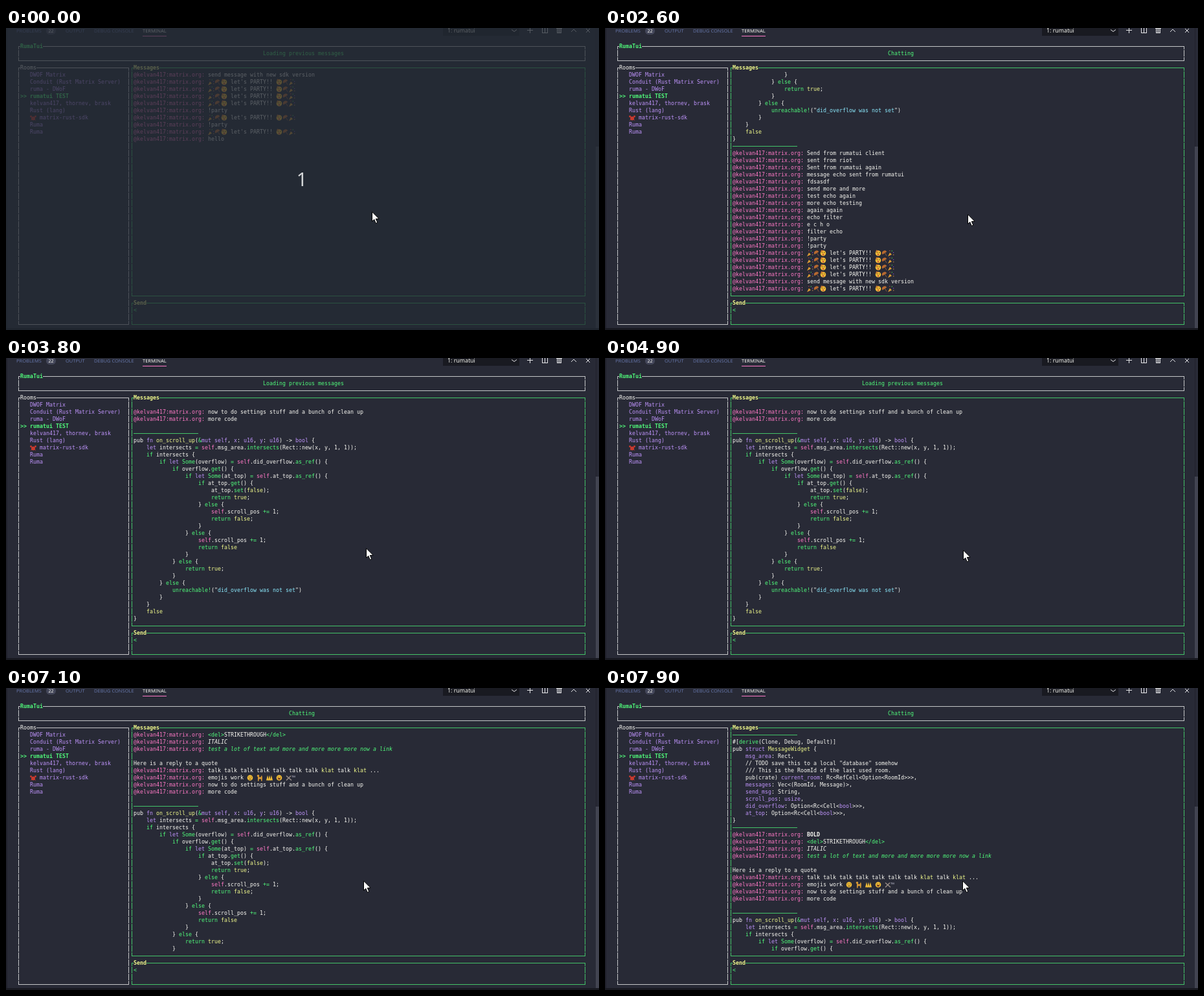
Recreate the animation shown at these times as an HTML page with a canvas. Size 916 px wide and 466 px high, loop 8 s.

```html
<!DOCTYPE html>
<html lang="en">
<head>
<meta charset="utf-8">
<title>Terminal chat client</title>
<style>
html, body { margin: 0; width: 100%; height: 100%; overflow: hidden; background: #282a36; }
canvas { display: block; }
</style>
</head>
<body>
<canvas id="stage" width="916" height="466"></canvas>
<script>
const ctx = document.getElementById('stage').getContext('2d');
const LOOP = 8000, CELL = 5, ROW = 11, VISIBLE = 31;
const MONO = '8.3px "DejaVu Sans Mono", monospace', SANS = '"Noto Sans", sans-serif';
const COLORS = { w: '#f8f8f2', p: '#ff79c6', v: '#bd93f9', g: '#50fa7b', y: '#f1fa8c', c: '#8be9fd' };
const GREY_LINE = '#c4c5c7', GREEN_LINE = '#43c268';
const USER = 'kelvan417';
const PARTY = "@🎉🎊🥳 let's PARTY!! 🥳🎊🎉";
const RULE = '---';

// A backtick plus a letter switches colour (w p v g y c) or style (B I).
const code = (depth, text) => ' '.repeat(depth * 4) + text;
const ELSE = '} `gelse `w{';
const ADD = '`pself`w.scroll_pos `g+= `w1;';
const LINES = [
  RULE,
  '#[`gderive`w(Clone, Debug, Default)]',
  'pub `vstruct `yMessageWidget `w{',
  code(1, '`vmsg_area`w: Rect,'),
  code(1, '// TODO save this to a local "database" somehow'),
  code(1, '/// This is the RoomId of the last used room.'),
  code(1, 'pub(crate) `vcurrent_room`w: Rc<RefCell<Option<RoomId>>>,'),
  code(1, '`vmessages`w: Vec<(RoomId, Message)>,'),
  code(1, '`vsend_msg`w: String,'),
  code(1, '`vscroll_pos`w: `vusize`w,'),
  code(1, '`vdid_overflow`w: Option<Rc<Cell<`vbool`w>>>,'),
  code(1, '`vat_top`w: Option<Rc<Cell<`vbool`w>>>,'),
  '}',
  RULE,
  '@`BBOLD',
  '@`g<del>`wSTRIKETHROUGH`g</del>',
  '@`IITALIC',
  '@`I`gtest a lot of text and more and more more more now a link',
  '',
  'Here is a reply to a quote',
  '@talk talk talk talk talk talk talk `yklat`w talk `yklat`w ...',
  '@emojis work 😐 🐕 👑 😆 🛠',
  '@now to do settings stuff and a bunch of clean up',
  '@more code',
  '',
  RULE,
  'pub `vfn `yon_scroll_up`w(`g&`vmut self`w, `vx`w: `vu16`w, `vy`w: `vu16`w) -> `vbool `w{',
  code(1, '`vlet `wintersects `g= `pself`w.msg_area.`gintersects`w(Rect::new(x, y, 1, 1));'),
  code(1, '`gif `wintersects {'),
  code(2, '`gif `vlet `gSome`w(overflow) `g= `pself`w.did_overflow.`gas_ref`w() {'),
  code(3, '`gif `woverflow.`gget`w() {'),
  code(4, '`gif `vlet `gSome`w(at_top) `g= `pself`w.at_top.`gas_ref`w() {'),
  code(5, '`gif `wat_top.`gget`w() {'),
  code(6, 'at_top.`gset`w(`yfalse`w);'),
  code(6, '`greturn `ytrue`w;'),
  code(5, ELSE),
  code(6, ADD),
  code(6, '`greturn `yfalse`w;'),
  code(5, '}'),
  code(4, ELSE),
  code(5, ADD),
  code(5, '`greturn `yfalse'),
  code(4, '}'),
  code(3, ELSE),
  code(4, '`greturn `ytrue`w;'),
  code(3, '}'),
  code(2, ELSE),
  code(3, '`gunreachable!`w("`cdid_overflow was not set`w")'),
  code(2, '}'),
  code(1, '}'),
  code(1, '`yfalse'),
  '}',
  RULE,
  '@Send from rumatui client',
  '@sent from riot',
  '@Sent from rumatui again',
  '@message echo sent from rumatui',
  '@fdsasdf',
  '@send more and more',
  '@test echo again',
  '@more echo testing',
  '@again again',
  '@echo filter',
  '@e c h o',
  '@filter echo',
  '@!party',
  '@!party',
  PARTY, PARTY, PARTY, PARTY,
  '@send message with new sdk version',
  PARTY, PARTY, PARTY, PARTY,
  '@!party',
  PARTY,
  '@!party',
  PARTY,
  '@hello'
];
const ROOMS = ['`vDWOF Matrix', '`vConduit (Rust Matrix Server)', '`vruma - DWoF', '`B`grumatui TEST',
  '`v' + USER + ', thornev, brask', '`vRust (lang)', '`v🦀 matrix-rust-sdk', '`vRuma', '`vRuma'];
const FIRST_BATCH = LINES.indexOf('@send message with new sdk version');
const SECOND_BATCH = LINES.indexOf('@now to do settings stuff and a bunch of clean up');

// Bursts of the wheel: start time, ticks of 100 ms, lines moved.
const BURSTS = [[1700, 2, 2], [2000, 4, 4], [2600, 7, 9], [3400, 5, 13], [6800, 7, 10], [7500, 2, 5], [7800, 2, 6]];
// Time, then the pointer tip.
const POINTER = [[0, 566, 283], [2600, 561, 287], [3800, 557, 293], [4900, 554, 296], [5200, 553, 297]];

const isLoading = t => t < 400 || t >= 3800 && t < 6200 || t >= 6800 && t < 6900;

function firstLine(t) {
  if (t < 400) return FIRST_BATCH;
  let top = LINES.length - VISIBLE - 1;
  for (const [start, ticks, lines] of BURSTS) {
    const done = Math.floor((t - start) / 100) + 1;
    top -= Math.round(lines * Math.max(0, Math.min(1, done / ticks)));
  }
  return top;
}

const colX = col => 17 + col * CELL;
const rowY = row => 28 + row * ROW;

function rect(color, x, y, w, h) {
  ctx.fillStyle = color;
  ctx.fillRect(x, y, w, h);
}

function dot(color, x, y, r, from = 0, to = 7) {
  ctx.fillStyle = color;
  ctx.beginPath();
  ctx.arc(x, y, r, from, to);
  ctx.fill();
}

function path(pts, closed) {
  ctx.beginPath();
  for (let i = 0; i < pts.length; i += 2) ctx.lineTo(pts[i], pts[i + 1]);
  if (closed) ctx.closePath();
}

function poly(color, ...pts) {
  path(pts, true);
  ctx.fillStyle = color;
  ctx.fill();
}

function line(color, width, ...pts) {
  path(pts);
  ctx.strokeStyle = color;
  ctx.lineWidth = width;
  ctx.stroke();
}

function label(str, x, y, size, color) {
  ctx.font = size + 'px ' + SANS;
  ctx.fillStyle = color;
  ctx.fillText(str, x, y);
}

function confetti(count) {
  for (let i = 0; i < count; i++) {
    const angle = i * 0.7 - 1.8;
    dot(`hsl(${i * 130}, 55%, 55%)`, 4 + 5 * Math.cos(angle), 6 + 5 * Math.sin(angle), 0.7);
  }
}

function face() {
  dot('#f0bd38', 5, 5, 4.3);
  for (const x of [3.4, 6.6]) dot('#5b3b15', x, 4, 0.7);
}

// Each glyph fills a 10 by 10 box.
const EMOJI = {
  '🎉'() {
    poly('#d99a35', 0, 10, 3, 4, 6, 7);
    confetti(4);
  },
  '🎊'() {
    dot('#b96a30', 5, 5, 4, 2.6, 5.7);
    line('#8a5a3a', 1, 5, 4, 8, 9);
  },
  '🥳'() {
    face();
    poly('#c9782f', 1, 4, 2, 0, 6, 1);
    dot('#c9503c', 5, 7, 1.2);
  },
  '😐'() {
    face();
    rect('#5b3b15', 3, 6.5, 4, 0.8);
  },
  '😆'() {
    face();
    dot('#70351f', 5, 5.6, 2.4, 0, Math.PI);
  },
  '🐕'() {
    dot('#d99a35', 2.5, 2, 1.7);
    for (const x of [2, 7]) rect('#d99a35', x, 2, 1.6, 8);
    rect('#d99a35', 2, 4, 6.5, 3);
  },
  '👑'() {
    for (const x of [2, 5, 8]) poly('#f0bd38', x - 2, 9, x, 1, x + 2, 9);
  },
  '🛠'() {
    line('#9a8f88', 1.5, 1, 9, 8, 2);
    line('#9a8f88', 1.5, 1, 2, 9, 9);
    label('™', 9, 7, 8, '#aaaabb');
  },
  '🦀'() {
    dot('#c93a2e', 5, 6, 3);
    for (const x of [1.5, 8.5]) {
      dot('#c93a2e', x, 3, 1.4);
      line('#c93a2e', 1, x, 9, 5, 5, x, 3);
    }
  }
};

function text(markup, col, row) {
  let x = colX(col), style = '', color = COLORS.w;
  const y = rowY(row);
  if (markup === RULE) return rect(GREEN_LINE, x, y, 20 * CELL, 1);
  if (markup[0] === '@') markup = '`p@' + USER + ':matrix.org:`w ' + markup.slice(1);
  const tokens = /`(.)|(\p{Extended_Pictographic})|([^`\p{Extended_Pictographic}]+)/gu;
  for (const [, mark, emoji, run] of markup.matchAll(tokens)) {
    if (mark === 'B') style = 'bold ';
    else if (mark === 'I') style = 'italic ';
    else if (mark) color = COLORS[mark];
    else if (emoji) {
      ctx.save();
      ctx.translate(x, y - 4.5);
      EMOJI[emoji]();
      ctx.restore();
      x += 2 * CELL;
    } else {
      ctx.font = style + MONO;
      ctx.fillStyle = color;
      for (const char of run) {
        ctx.fillText(char, x, y + 3);
        x += CELL;
      }
    }
  }
}

function box(color, c0, r0, c1, r1, style, title) {
  const x0 = colX(c0) + 2, x1 = colX(c1) + 2, y0 = rowY(r0), y1 = rowY(r1);
  const start = colX(c0 + 1 + title.length);
  rect(color, start, y0, x1 - start + 1, 1);
  rect(color, x0, y0, 3, 1);
  rect(color, x0, y1, x1 - x0 + 1, 1);
  for (const x of [x0, x1]) {
    rect(color, x, y0, 1, 5);
    rect(color, x, y1 - 5, 1, 5);
    for (let r = r0 + 1; r < r1; r++) rect(color, x, rowY(r) - 5, 1, 10);
  }
  text(style + title, c0 + 1, r0);
}

function toolbar() {
  const icon = '#e4e4e6', dim = '#6272a4';
  const chevron = (x, y, rise) => line(icon, 1, x - 4, y + rise, x, y, x + 4, y + rise);
  const pill = (x, w) => {
    ctx.fillStyle = '#44475a';
    ctx.beginPath();
    ctx.roundRect(x, -1, w, 11, 5.5);
    ctx.fill();
  };
  label('PROBLEMS', 16, 7, 7.5, dim);
  label('OUTPUT', 92, 7, 7.5, dim);
  label('DEBUG CONSOLE', 136, 7, 7.5, dim);
  label('TERMINAL', 211, 7, 7.5, COLORS.w);
  rect(COLORS.p, 211, 12, 37, 1);
  pill(62, 15);
  label('22', 65.5, 7, 7, COLORS.w);

  rect('#191a21', 675, 0, 118, 12);
  label('1: rumatui', 682, 7, 8.8, COLORS.w);
  chevron(785, 5.5, -3);
  rect(icon, 805, 3, 9, 1);
  rect(icon, 809, 0, 1, 8);
  for (const x of [828, 832, 836]) rect(icon, x, 0, 1, 8);
  rect(icon, 828, 7, 9, 1);
  rect(icon, 850, 0, 9, 1);
  for (const x of [851, 853, 855, 857]) rect(icon, x, 0, 1, 8);
  rect(icon, 851, 7, 7, 1);
  chevron(877, 2, 4);
  for (const s of [-3, 3]) line(icon, 1, 899 - s, 1, 899 + s, 7);
}

function pointer(x, y) {
  ctx.save();
  ctx.translate(x - 0.5, y + 0.8);
  path([0, 0, 0, 14.5, 3.3, 11.6, 5.8, 17.5, 8.3, 16.4, 5.8, 10.8, 10.5, 10.5], true);
  ctx.fillStyle = '#fff';
  ctx.fill();
  ctx.strokeStyle = '#000';
  ctx.lineWidth = 1;
  ctx.stroke();
  ctx.restore();
}

function draw(t) {
  rect('#282a36', 0, 0, 916, 466);
  rect('#20212b', 0, 0, 2, 466);
  rect('#21222c', 911, 0, 1, 463);
  rect('#424451', 911, 183, 5, 280);
  rect('#191a21', 0, 463, 916, 3);
  toolbar();

  box(GREY_LINE, 0, 0, 175, 2, '`B`g', 'RumaTui');
  if (isLoading(t)) text('`gLoading previous messages', 76, 1);
  else text('`gChatting', 84, 1);

  box(GREY_LINE, 0, 3, 34, 39, '', 'Rooms');
  ROOMS.forEach((room, i) => text(room, 4, 4 + i));
  text('`B`g>>', 1, 7);

  box(GREEN_LINE, 35, 3, 175, 35, '`B`y', 'Messages');
  box(GREEN_LINE, 35, 36, 175, 39, '`B`y', 'Send');
  text('`g<', 36, 37);

  const top = firstLine(t), loaded = t < 6200 ? SECOND_BATCH : 0;
  for (let i = Math.max(top, loaded); i < Math.min(top + VISIBLE, LINES.length); i++) {
    text(LINES[i], 36, 4 + i - top);
  }

  // Countdown veil before the session starts
  if (t < 400) {
    rect('rgba(36, 43, 52, 0.74)', 0, 0, 916, 466);
    ctx.textAlign = 'center';
    label('1', 457, 244, 29, '#d3d5d7');
    ctx.textAlign = 'left';
  }
  const [, x, y] = POINTER.findLast(key => key[0] <= t);
  pointer(x, y);
}

const begin = performance.now();
function tick() {
  draw((performance.now() - begin) % LOOP);
  requestAnimationFrame(tick);
}
tick();
</script>
</body>
</html>
```
